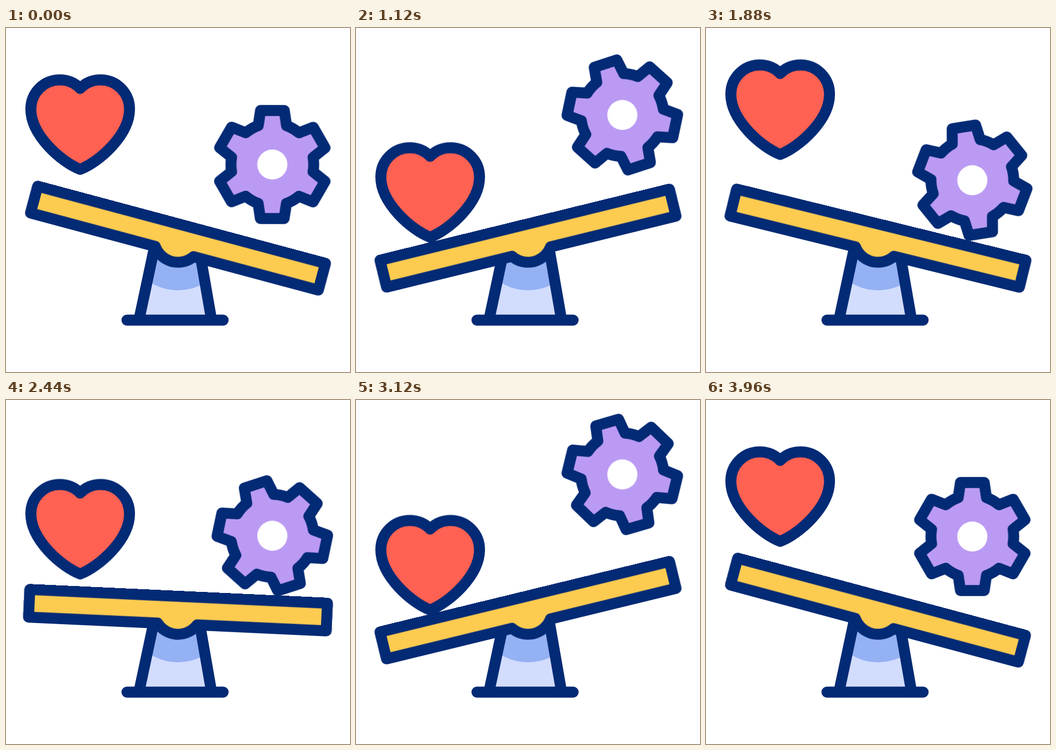
Animation of 640 by 640 pixels, one loop 4000 ms. Source, as an HTML page:

```html
<!DOCTYPE html>
<html lang="en">
<head>
<meta charset="utf-8">
<title>Seesaw</title>
<style>
  html, body { margin: 0; width: 100%; height: 100%; overflow: hidden; background: #fff; }
  svg { display: block; width: 100vw; height: 100vh; }
  .line { stroke: #032a75; stroke-width: 20.4; stroke-linecap: round; stroke-linejoin: round; }
</style>
</head>
<body>
<svg viewBox="0 0 640 640">
  <path fill="#d2dcfd" d="M276.8 405H358.4L382.4 543H247.4Z"/>
  <path fill="#94b1f4" d="M276.8 405H358.4L371 473.5A97 97 0 0 1 262.5 469Z"/>
  <path class="line" fill="none" d="M276.8 405L247.4 543M358.4 405L382.4 543M225 543.5H404"/>
  <g transform="translate(320 391)">
    <path id="board" class="line" fill="#fdcb50"
      d="M-277.2 -25.7H277.2V25.7H36.9A45 45 0 0 1 -36.9 25.7H-277.2Z"/>
  </g>
  <path id="heart" class="line" fill="#ff6152"
    d="M138 112.5C128 102 114 96.5 100 96.5C70 96.5 46.2 121 46.2 151C46.2 200 104 250 138 263C172 250 229.8 200 229.8 151C229.8 121 206 96.5 176 96.5C162 96.5 148 102 138 112.5Z"/>
  <g id="gear">
    <path id="cog" class="line" fill="#bb9af3"/>
    <circle r="28" fill="#fff"/>
  </g>
</svg>
<script>
  const LOOP = 4000;
  const FRAME = 40;
  const KEYS = [0, 25, 50, 75, 99];
  const byId = id => document.getElementById(id);

  // Six teeth joined by arcs of the body circle.
  function cogPath() {
    const polar = (radius, degrees) => {
      const a = degrees * Math.PI / 180;
      return `${(radius * Math.sin(a)).toFixed(2)} ${(-radius * Math.cos(a)).toFixed(2)}`;
    };
    let d = '';
    for (let turn = 0; turn < 360; turn += 60) {
      d += turn ? `A77 77 0 0 1 ${polar(77, turn - 20)}` : `M${polar(77, -20)}`;
      d += `L${polar(102.9, turn - 12.4)}L${polar(102.9, turn + 12.4)}L${polar(77, turn + 20)}`;
    }
    return d + `A77 77 0 0 1 ${polar(77, -20)}Z`;
  }

  // Eases through one value per key, then holds until the loop ends.
  function play(id, values, eases, toTransform) {
    const steps = values.map((value, i) => ({
      offset: KEYS[i] * FRAME / LOOP,
      transform: toTransform(value),
      easing: eases[i] ? `cubic-bezier(${eases[i]})` : 'linear'
    }));
    steps.push({ offset: 1, transform: toTransform(values[values.length - 1]) });
    byId(id).animate(steps, { duration: LOOP, iterations: Infinity });
  }

  const swing = '.333,0,.667,1';
  const drop = '.3,0,.4,1';

  byId('cog').setAttribute('d', cogPath());

  play('board', [15, -15, 15, -15, 15], [swing, swing, swing, swing],
    angle => `rotate(${angle}deg)`);
  play('heart', [0, 131, -42, 131, 0], [drop, '.41,0,.81,1', drop, '.45,0,.75,1'],
    y => `translate(0px, ${y}px)`);
  play('gear', [254, 152, 287, 134.5, 254],
    ['.6,0,.7,1', '.22,0,.6,1', '.62,0,.7,1', '.333,0,.833,.833'],
    y => `translate(495.5px, ${y}px)`);
  play('cog', [0, 90.91, 181.82, 272.73, 360], [],
    angle => `rotate(${angle}deg)`);
</script>
</body>
</html>
```
